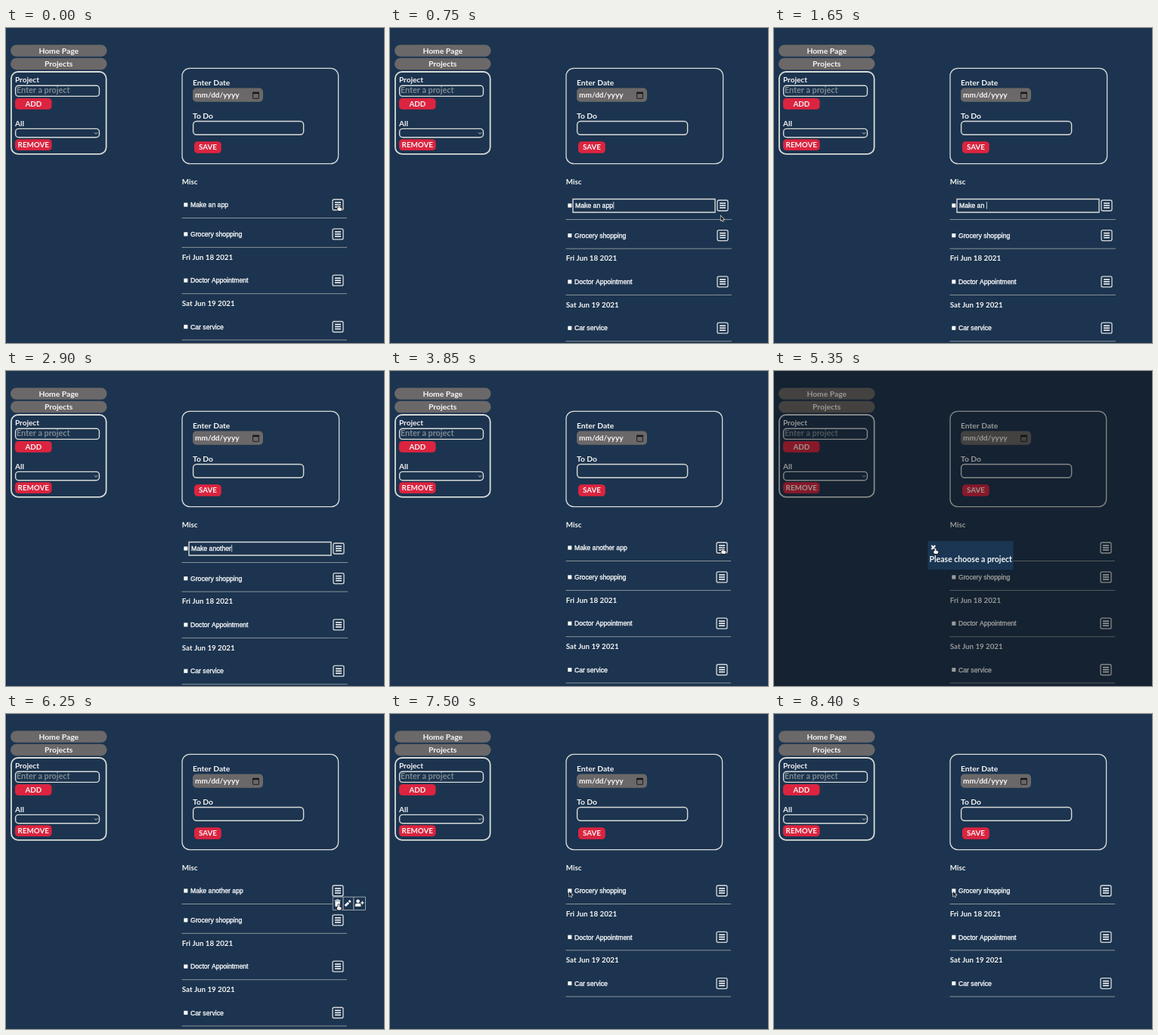
Recreate the animation shown at these times as an HTML page with a canvas. Size 500 px wide and 417 px high, loop 8450 ms.

```html
<!DOCTYPE html>
<html lang="en">
<head>
<meta charset="utf-8">
<title>To do list</title>
<style>
html, body { margin: 0; width: 100%; height: 100%; overflow: hidden; background: #1c344f; }
canvas { display: block; width: 100vw; height: 100vh; }
</style>
</head>
<body>
<canvas id="stage"></canvas>
<script>
const W = 500, H = 417, LOOP = 8450;
const BG = '#1c344f', GREY = '#6b6869', RED = '#dc2440', LIGHT = '#d9dbda', RULE = '#89939a', INK = '#17191c';
const ROUND = 'Lato, "Open Sans", sans-serif';
const PLAIN = '"Liberation Sans", Arial, sans-serif';

const canvas = document.getElementById('stage');
const g = canvas.getContext('2d');
const ratio = window.devicePixelRatio || 1;
canvas.width = W * ratio;
canvas.height = H * ratio;

// When each state of the page begins, in ms
const AT = {
  menu1: 200, edit: 650, erase: 1200, retype: 1990, saved: 3400,
  menu2: 3900, modal: 4950, close: 5450, menu3: 6050, remove: 6450
};

// Places the pointer visits, and when it leaves for each
const SPOT = {
  icon: [440.5, 234.5], pencil: [452, 250], field: [300, 236], person: [467, 251],
  cross: [213.5, 234.5], bin: [440, 252], check: [237, 235]
};
const MOVES = [
  [250, 'pencil'], [700, 'field'], [3450, 'icon'], [4000, 'person'],
  [4970, 'cross'], [5550, 'icon'], [6060, 'bin'], [6900, 'check']
];

const between = (t, a, b) => t >= a && t < b;

function rect(x, y, w, h, color) {
  g.fillStyle = color;
  g.fillRect(x, y, w, h);
}

function outline(color, width) {
  g.strokeStyle = color;
  g.lineWidth = width;
  g.stroke();
}

function box(x, y, w, h, r, fill, edge, width = 1.4) {
  g.beginPath();
  g.roundRect(x, y, w, h, r);
  if (fill) { g.fillStyle = fill; g.fill(); }
  if (edge) outline(edge, width);
}

function line(...points) {
  g.beginPath();
  points.forEach(([x, y]) => g.lineTo(x, y));
}

function label(str, x, y, size = 10.3, color = '#f6f6f5', weight = 700) {
  g.font = `${weight} ${size}px ${ROUND}`;
  g.fillStyle = color;
  g.fillText(str, x, y);
}

function centred(str, x, y, size) {
  g.textAlign = 'center';
  label(str, x, y, size);
  g.textAlign = 'left';
}

// Item text, slightly emboldened
function plain(str, x, y) {
  g.font = `8.67px ${PLAIN}`;
  g.fillStyle = g.strokeStyle = '#fff';
  g.lineWidth = 0.3;
  g.fillText(str, x, y);
  g.strokeText(str, x, y);
}

function button(str, x, y, w, h) {
  box(x, y, w, h, 4.5, RED);
  centred(str, x + w / 2, y + h / 2 + 3.4, 9.8);
}

function sidebar() {
  ['Home Page', 'Projects'].forEach((str, i) => {
    box(6, 22.3 + i * 17.5, 127.5, 15.5, 7.7, GREY);
    centred(str, 69.7, 33.6 + i * 17.5);
  });
  box(6.9, 58, 125.7, 108.8, 9, null, LIGHT, 1.8);
  label('Project', 12, 72, 10);
  box(12.6, 76.2, 110.8, 14.2, 4, null, LIGHT);
  label('Enter a project', 14, 86.3, 10.8, '#7d8993');
  button('ADD', 12, 93, 48.5, 14.8);
  label('All', 12, 129.6, 10);
  box(12.6, 133.4, 110.8, 11.4, 4, null, LIGHT);
  line([117, 138.3], [119, 140.3], [121, 138.3]);
  outline(LIGHT, 0.9);
  button('REMOVE', 12, 147.3, 48.5, 14.8);
}

function form(wide) {
  box(233, 53.3, 206.6 + wide, 126.4, 10, null, LIGHT, 1.3);
  label('Enter Date', 247, 76);
  box(247, 79.5, 93, 18.3, 5, GREY);
  label('mm/dd/yyyy', 250, 92, 10.1);
  box(326.6, 85.3, 7.8, 8, 0.5, null, INK, 1);
  rect(326.2, 84.8, 8.6, 2.4, INK);
  label('To Do', 247, 119.5);
  box(247.6, 123.5, 146, 17.8, 4.5, null, LIGHT);
  button('SAVE', 249, 150.3, 35.8, 15.4);
}

function item(str, y, wide, editing) {
  rect(235.3, y - 2.6, 5, 5.2, '#fff');
  if (editing) box(242, y - 8.5, 188, 17.5, 0, null, LIGHT);
  const x = editing ? 245 : 244;
  plain(str, x, y + 3.2);
  if (editing) rect(x + g.measureText(str).width + 0.3, y - 5, 0.9, 9.5, '#d5dade');
  box(432 + wide, y - 7, 14, 14, 2, null, LIGHT, 1.3);
  for (const dy of [-3, 0, 3]) rect(435 + wide, y + dy - 0.8, 8, 1.5, '#fff');
  rect(232.5, y + (editing ? 18 : 17), 218.5 + wide, 1, RULE);
}

// First item: erase the last word, then type the rest of the new text
function typed(t) {
  if (t < AT.retype) {
    const erased = Math.max(0, Math.floor((t - AT.erase) / 130));
    return 'Make an app'.slice(0, 11 - Math.min(3, erased));
  }
  return 'Make another app'.slice(0, 7 + Math.floor((t - AT.retype) / 155));
}

function list(t, editing, wide) {
  const first = t < AT.remove ? [typed(t)] : [];
  const groups = [
    ['Misc', ...first, 'Grocery shopping'],
    ['Fri Jun 18 2021', 'Doctor Appointment'],
    ['Sat Jun 19 2021', 'Car service']
  ];
  let y = 202.8;
  groups.forEach(([title, ...items], group) => {
    label(title, 232.8, y + 3.7, 9.75);
    y += 31.2;
    items.forEach((str, i) => {
      const active = editing && group + i === 0;
      if (active) y += 1;
      item(str, y, wide, active);
      y += active ? 39.6 : 38.9;
    });
    y -= 8.8;
  });
}

function menu() {
  for (let i = 0; i < 3; i++) {
    box(432.3 + i * 13.8, 242.2, i < 2 ? 13.8 : 15.6, 17.3, 0, BG, '#98a1a8', 1);
  }
  // bin
  rect(434.7, 246.3, 7.8, 1.2, '#fff');
  rect(437.2, 245.4, 2.8, 1, '#fff');
  box(435.4, 248, 6.4, 7, [0, 0, 1, 1], '#fff');
  // pencil
  line([448.7, 254], [453, 249.7]);
  outline('#fff', 3);
  line([453.8, 248.9], [455.6, 247.1]);
  outline('#fff', 3);
  // person with plus
  box(463.3, 245.5, 4.6, 4.6, 2.3, '#fff');
  box(461.8, 250.7, 7.6, 4, [2.4, 2.4, 0.5, 0.5], '#fff');
  rect(469.2, 249.3, 4.4, 1.2, '#fff');
  rect(470.8, 247.7, 1.2, 4.4, '#fff');
}

function modal() {
  rect(0, 0, W, H, 'rgba(8,8,6,.4)');
  rect(203.5, 225, 113, 38, '#1a3653');
  for (const s of [-2.5, 2.5]) {
    line([210.8 - s, 231], [210.8 + s, 236]);
    outline('#fff', 1.8);
  }
  label('Please choose a project', 205.5, 253, 10.5);
}

function position(t) {
  let [x, y] = SPOT.icon;
  for (const [begin, name] of MOVES) {
    if (t < begin) break;
    const dx = SPOT[name][0] - x, dy = SPOT[name][1] - y;
    const u = Math.min(1, (t - begin) / (140 + 0.8 * Math.hypot(dx, dy)));
    const ease = u * u * (3 - 2 * u);
    x += dx * ease;
    y += dy * ease;
  }
  return [x, y];
}

function hand() {
  for (const [grow, color] of [[0.6, INK], [0, '#f4f4f4']]) {
    box(-0.8 - grow, -grow, 1.6 + 2 * grow, 5 + 2 * grow, 0.8, color);
    box(-2.2 - grow, 3.2 - grow, 5.8 + 2 * grow, 4.2 + 2 * grow, 1.6, color);
  }
}

function arrow() {
  line([0, 0], [0, 6.2], [1.5, 5], [2.5, 7.2], [3.5, 6.8], [2.6, 4.6], [4.4, 4.5]);
  g.closePath();
  outline('#eceeee', 1.2);
  g.fillStyle = INK;
  g.fill();
}

function beam() {
  rect(-0.4, -4, 0.9, 8, LIGHT);
  for (const y of [-4, 3.2]) rect(-1.6, y, 3.2, 0.8, LIGHT);
}

function pointer(t, open) {
  if (between(t, AT.erase, AT.saved)) return;
  const [x, y] = position(t);
  const near = name => Math.hypot(x - SPOT[name][0], y - SPOT[name][1]) < 8;
  const link = near('icon') || open || (near('cross') && t < AT.close);
  g.save();
  g.translate(x, y);
  if (link) hand();
  else if (near('field')) beam();
  else arrow();
  g.restore();
}

function draw(t) {
  const editing = between(t, AT.edit, AT.saved);
  const wide = editing ? 1 : 0;
  const open = between(t, AT.menu1, AT.edit) || between(t, AT.menu2, AT.modal) ||
    between(t, AT.menu3, AT.remove);
  g.setTransform(ratio, 0, 0, ratio, 0, 0);
  rect(0, 0, W, H, BG);
  sidebar();
  form(wide);
  list(t, editing, wide);
  if (open) menu();
  if (between(t, AT.modal, AT.close)) modal();
  pointer(t, open);
}

const start = performance.now();
function tick() {
  const t = (performance.now() - start) % LOOP;
  draw(Math.floor(t / 50) * 50);
  requestAnimationFrame(tick);
}
tick();
</script>
</body>
</html>
```
